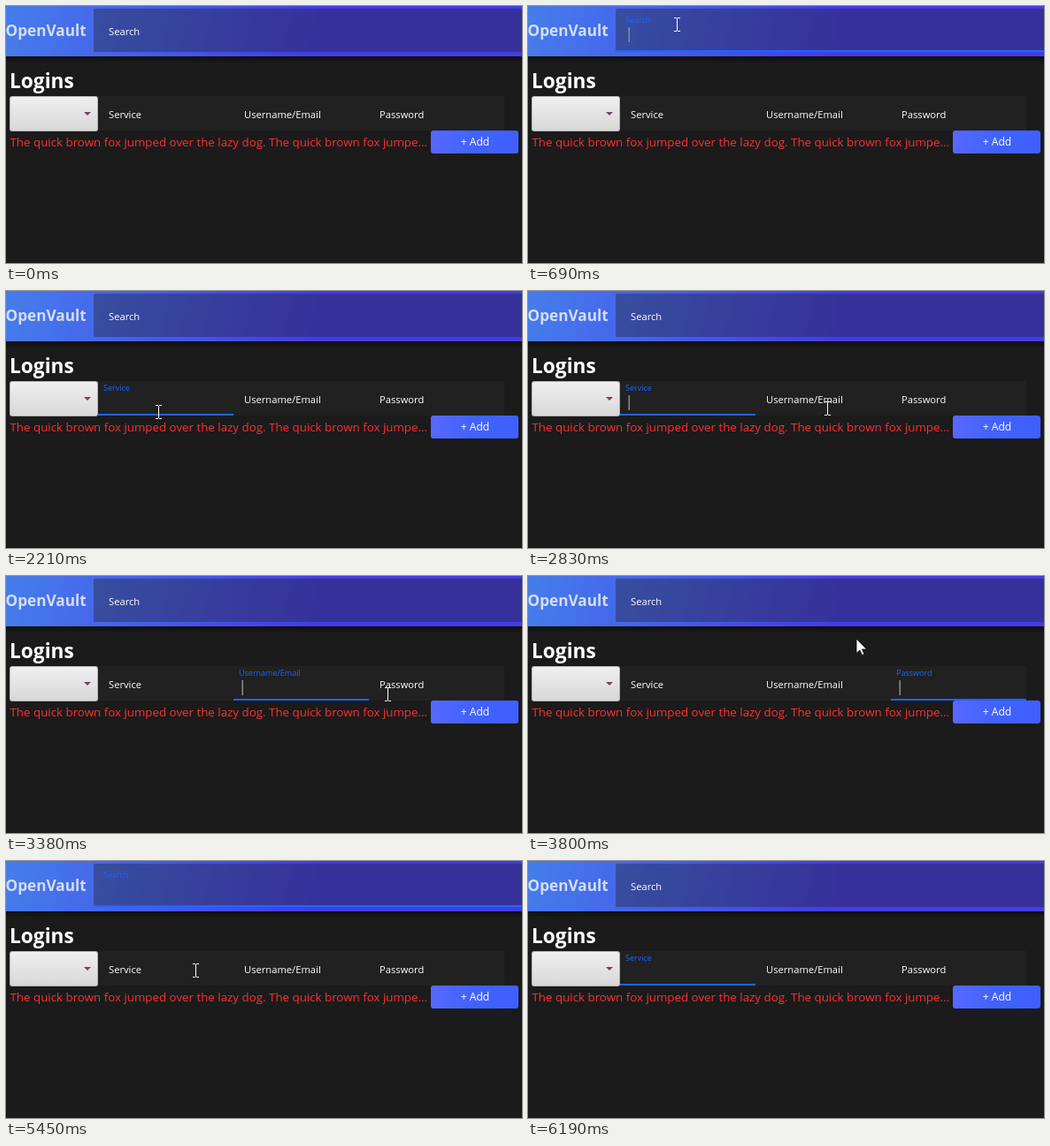
An HTML page for the animation above (6580 ms loop, 583 by 291 pixels).

```html
<!DOCTYPE html>
<html lang="en">
<head>
<meta charset="utf-8">
<title>OpenVault</title>
<style>
html, body { margin: 0; width: 100%; height: 100%; overflow: hidden; background: #1b1b1b; }
svg { display: block; width: 583px; height: 291px; }
text { font-family: "Open Sans", "Noto Sans", sans-serif; fill: #fff; white-space: pre; }
</style>
</head>
<body>
<svg viewBox="0 0 583 291">
  <defs>
    <linearGradient id="head" gradientUnits="userSpaceOnUse" x1="0" y1="0" x2="340" y2="80">
      <stop offset="0" stop-color="#467dea"/>
      <stop offset=".35" stop-color="#4565ec"/>
      <stop offset="1" stop-color="#433ce5"/>
    </linearGradient>
    <linearGradient id="shade" x2="0" y2="1">
      <stop offset="0" stop-color="#000" stop-opacity=".45"/>
      <stop offset="1" stop-color="#000" stop-opacity="0"/>
    </linearGradient>
    <linearGradient id="combo" x2="0" y2="1">
      <stop offset="0" stop-color="#efefef"/>
      <stop offset="1" stop-color="#d8d8d8"/>
    </linearGradient>
    <linearGradient id="button">
      <stop offset="0" stop-color="#5868ff"/>
      <stop offset=".5" stop-color="#4062ff"/>
      <stop offset="1" stop-color="#3f60ff"/>
    </linearGradient>
  </defs>
  <rect width="583" height="291" fill="#1b1b1b"/>
  <rect y="57" width="583" height="8" fill="url(#shade)"/>
  <rect width="583" height="57" fill="url(#head)"/>
  <path d="M99 52V5q0-2 2-2H583V52z" fill="#202020" fill-opacity=".38"/>
  <text x="-.5" y="33.5" font-size="17.2" font-weight="700" style="fill:#d3def8">OpenVault</text>
  <text x="4" y="93" font-size="22.7" font-weight="700">Logins</text>
  <rect x="104" y="102" width="459" height="39" fill="#212121"/>
  <rect x="4" y="102" width="100" height="40" rx="3" fill="#b5b5b5"/>
  <rect x="5" y="103" width="98" height="38" rx="2" fill="url(#combo)"/>
  <path d="M88 120h8l-4 4z" fill="#7c3f66"/>
  <text x="4.5" y="159" font-size="13.33" style="fill:#ff3030">The quick brown fox jumped over the lazy dog. The quick brown fox jumpe...</text>
  <rect x="480" y="141" width="99" height="26" rx="3" fill="url(#button)"/>
  <text x="530" y="158" font-size="12.1" text-anchor="middle">+ Add</text>
  <g id="fields"></g>
  <rect id="caret" width="1.5" height="17" fill="#8c8c8c"/>
  <g id="pointer">
    <circle id="press" cx="-2" r="12" fill="#e6e000" fill-opacity=".56"/>
    <path id="beam" d="M-3-7.5H0M1-7.5H4M.5-7V7M-3 7.5H0M1 7.5H4" fill="none" stroke="#fff"/>
    <path id="arrow" d="M0 0V16.5L3.8 13L6.4 18.8L9 17.6L6.5 12H11.6Z" fill="#fff" stroke="#000" stroke-width=".8"/>
  </g>
</svg>
<script>
const LOOP = 6580, BLUE = '#1c66ff';
const $ = id => document.getElementById(id);
const set = (el, attrs) => { for (const k in attrs) el.setAttribute(k, attrs[k]); };
const show = (el, on) => { el.style.display = on ? '' : 'none'; };
const mix = (a, b, k) => a + (b - a) * k;
const ease = k => k * k * (3 - 2 * k);
const svgEl = tag => $('fields').appendChild(document.createElementNS('http://www.w3.org/2000/svg', tag));

function makeField(name, x, y, left, right) {
  const rule = svgEl('rect'), label = svgEl('text');
  set(rule, { x: left, y, width: right - left, height: 2, fill: BLUE });
  label.textContent = name;
  return { x, y: y - 12, rule, label };
}
const search = makeField('Search', 104, 50, 99, 583);
search.y = 33;
const [service, user, pass] = ['Service', 'Username/Email', 'Password']
  .map((name, i) => makeField(name, 104 + 153 * i, 139, 104 + 153 * i, 257 + 153 * i));
const fields = [search, service, user, pass];

// pointer stops: arrival, time at rest, place, and the field clicked there
const stops = [
  { at: 130, x: 175, y: 228 },
  { at: 560, rest: 440, x: 168, y: 21, click: 560, field: search },
  { at: 1270, rest: 270, x: 158, y: 126, click: 1470, field: service },
  { at: 2080, rest: 130, x: 172, y: 137 },
  { at: 2830, rest: 270, x: 338, y: 133, click: 3040, field: user },
  { at: 3600, rest: 60, x: 495, y: 134, click: 3650, field: pass },
  { at: 3800, x: 371, y: 71 },
  { at: 4020, x: 332, y: 13 },
  { at: 4390, x: 329, y: 57 },
  { at: 4650, rest: 400, x: 341, y: 39, click: 4650, field: search },
  { at: 5450, rest: 270, x: 214, y: 124, click: 5680, field: service },
  { at: 6190, x: 245, y: 296 }
];

function drawFields(t) {
  const { click, field } = stops.findLast(s => s.click <= t) || {};
  for (const f of fields) {
    const up = f === field;
    set(f.label, { x: f.x + (up ? 6 : 12), y: f.y - (up ? 14 : 0), 'font-size': up ? 9 : 11.2 });
    f.label.style.fill = up ? BLUE : '';
    show(f.rule, up);
  }
  const age = t - click;
  show($('caret'), age >= 75 && age % 1000 < 500);
  if (field) set($('caret'), { x: field.x + 9.5, y: field.y - 9 });
  show($('press'), age < 100);
}

function drawPointer(t) {
  const i = stops.findLastIndex(s => s.at <= t);
  show($('pointer'), i >= 0);
  if (i < 0) return;
  const a = stops[i], b = stops[i + 1] || a, leave = a.at + (a.rest || 0);
  const k = t <= leave || a === b ? 0 : ease((t - leave) / (b.at - leave));
  const x = Math.round(mix(a.x, b.x, k)), y = Math.round(mix(a.y, b.y, k));
  const overText = x > 99 && y > 3 && y < 52 || x > 104 && x < 563 && y > 102 && y < 141;
  set($('pointer'), { transform: `translate(${x} ${y})` });
  show($('beam'), overText);
  show($('arrow'), !overText);
}

const begin = performance.now();
function frame() {
  const t = (performance.now() - begin) % LOOP;
  drawFields(t);
  drawPointer(t);
  requestAnimationFrame(frame);
}
frame();
</script>
</body>
</html>
```
